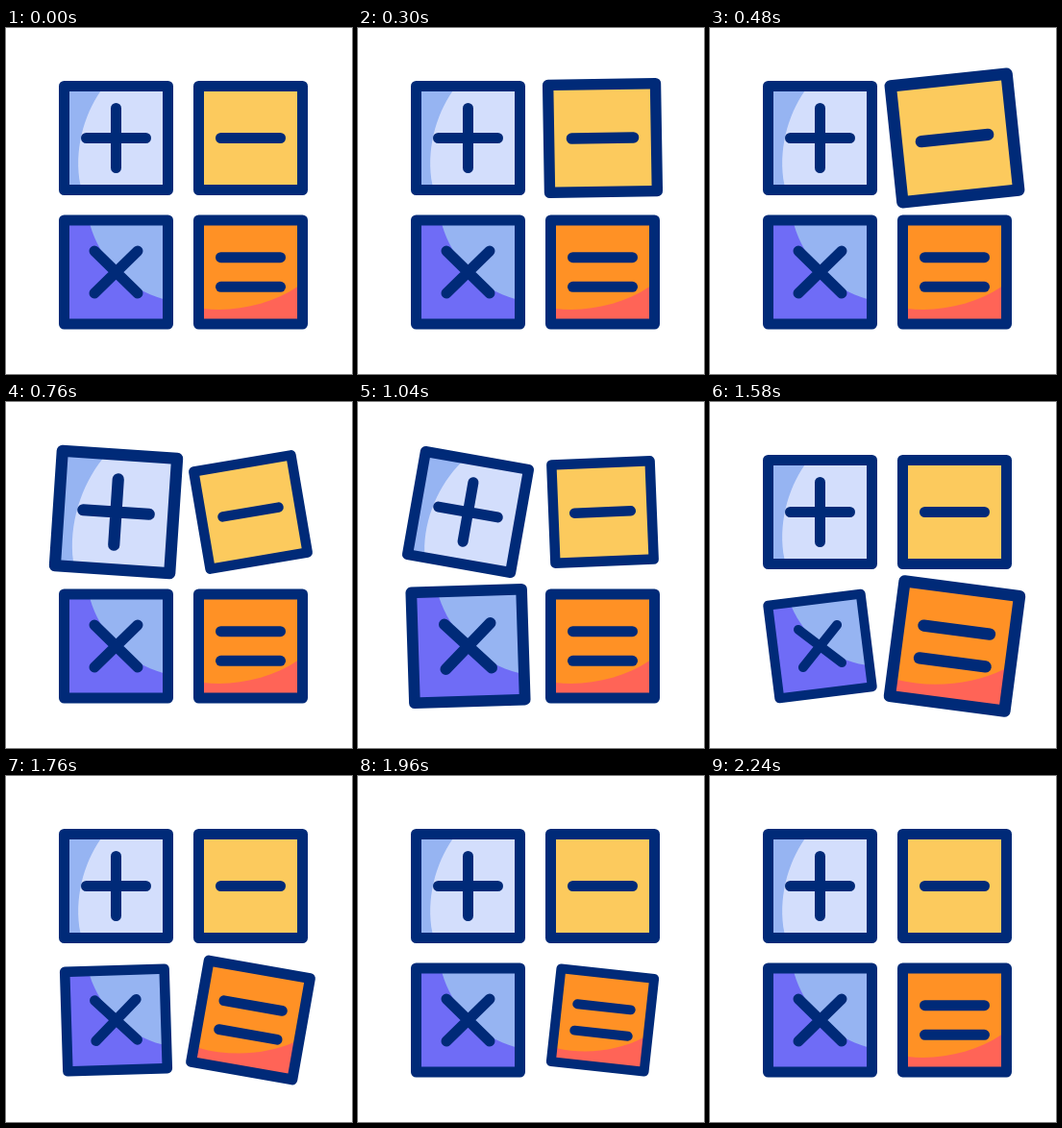
An HTML page that plays this animation: 360x360 px, repeating every 2.4 s.

```html
<!DOCTYPE html>
<html lang="en">
<head>
<meta charset="utf-8">
<title>Calculator keys</title>
<style>
  html, body { margin: 0; width: 100%; height: 100%; overflow: hidden; background: #fff; }
  svg { display: block; width: 100vw; height: 100vh; }

  .line, .frame {
    fill: none;
    stroke: #002a78;
    stroke-width: 11;
    stroke-linecap: round;
    stroke-linejoin: round;
  }

  /* Each key swells, tilts, shrinks and settles, one after another. */
  .key {
    --tilt: 10deg;
    transform-origin: 0 0;
    animation: tilt 2400ms infinite, pulse 2400ms infinite;
    animation-timing-function: cubic-bezier(.37, 0, .63, 1);
    animation-delay: calc(200ms + var(--i) * 350ms);
  }
  .left { --tilt: -10deg; }

  @keyframes tilt {
    0%, 41.667%, 100% { rotate: 0deg; }
    20.833% { rotate: var(--tilt); }
  }
  @keyframes pulse {
    0%, 41.667%, 100% { scale: 1; }
    11.667% { scale: 1.125; }
    28.75% { scale: .9; }
  }
</style>
</head>
<body>
<svg viewBox="0 0 360 360">
  <defs>
    <rect id="box" x="-54" y="-54" width="108" height="108"/>
    <path id="bar" d="M-31 0H31"/>
  </defs>

  <g transform="translate(114.5 114.5)">
    <g class="key" style="--i: 1">
      <use href="#box" fill="#d3defc"/>
      <path fill="#96b4f2" d="M-16 -49C-34 -23 -44 14 -37 49V54H-54V-54H-13Z"/>
      <use href="#box" class="frame"/>
      <path class="line" d="M-31 0H31M0 -31V31"/>
    </g>
  </g>

  <g transform="translate(254.5 114.5)">
    <g class="key left" style="--i: 0">
      <use href="#box" fill="#fcca5d"/>
      <use href="#box" class="frame"/>
      <use href="#bar" class="line"/>
    </g>
  </g>

  <g transform="translate(114.5 254)">
    <g class="key left" style="--i: 2">
      <use href="#box" fill="#6f6cf6"/>
      <path fill="#96b4f2" d="M-27 -49C-17 -14 12 18 49 28H54V-54H-28Z"/>
      <use href="#box" class="frame"/>
      <path class="line" d="M-22.5 -22L22.5 22M22.5 -22L-22.5 22"/>
    </g>
  </g>

  <g transform="translate(254.5 254)">
    <g class="key" style="--i: 3">
      <use href="#box" fill="#ff9125"/>
      <path fill="#ff6457" d="M-49 38C-15 42 22 33 49 15H54V54H-54V38Z"/>
      <use href="#box" class="frame"/>
      <use href="#bar" class="line" y="-15.3"/>
      <use href="#bar" class="line" y="15.3"/>
    </g>
  </g>
</svg>
</body>
</html>
```
